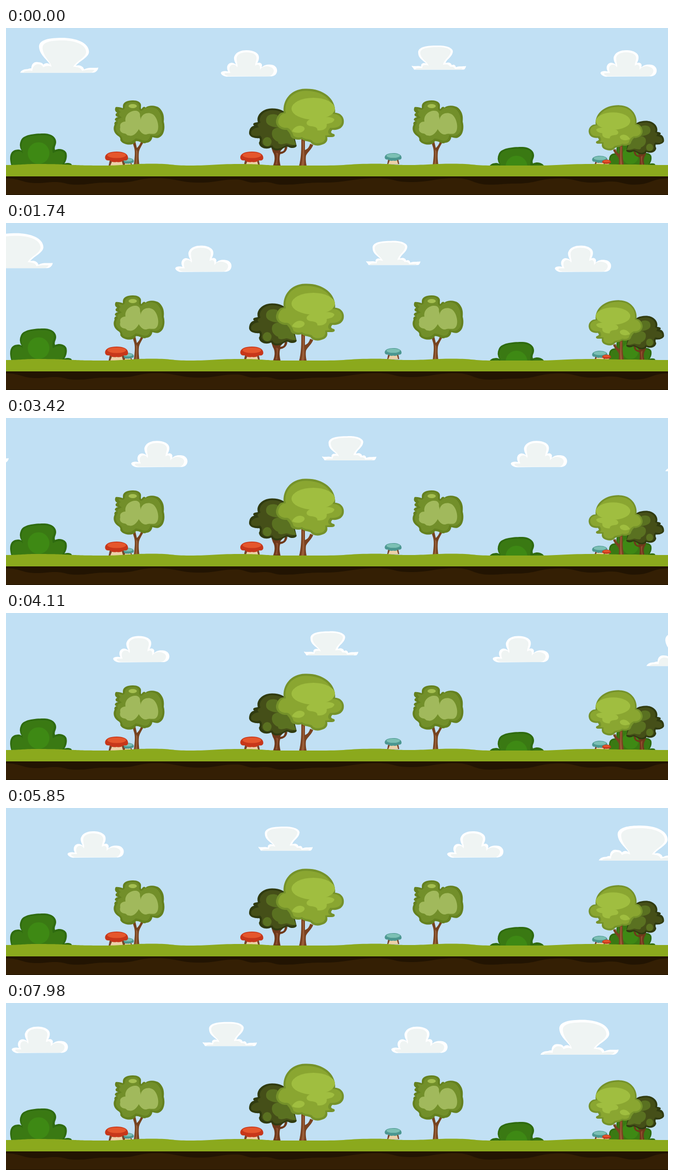
Write an HTML page that moves like this. It is 1280 by 323 pixels and loops after 8 s.

```html
<!DOCTYPE html>
<html lang="en">
<head>
<meta charset="utf-8">
<title>Meadow with drifting clouds</title>
<style>
  html, body { margin: 0; width: 100%; height: 100%; overflow: hidden; background: #c1e0f4; }
  svg { display: block; width: 1280px; height: 323px; }
  /* Lighter body inside a darker rim of the same outline */
  .inset { transform-box: fill-box; transform-origin: 50% 50%; transform: scale(.94); }
</style>
</head>
<body>
<svg viewBox="0 0 1280 323" xmlns="http://www.w3.org/2000/svg">
  <defs>
    <g id="wideCloud">
      <path fill="#fff" d="M27.5 86.5C29 82 35 79 42 79.5Q45 77.5 49 78C49 70 54 65 61 66C68 66 72 69 72 71C76 67 82 67 85 71C83 64 66 54 64 38C62 22 85 19 108 19C135 19 160 28 160.500 46C160 57 143 63 135 73C141 71 149 73 151 80C160 75 170 78 178.500 76.500C178 82 173 86.500 168 86.500Z"/>
      <path fill="#eff4f3" d="M33 86.500C36 82.500 42 82 51 83C51 76 55 70 62 70C68 70 71 73 72 76C76 73 83 72 88 75C88 67 74 58 71 42C68 27 85 24 108 24C132 24 155 31 155 47C154 58 137 63 130 75C138 75 146 77 147 83C156 80 163 81 171 81C169 84 166 86.500 162 86.500Z"/>
    </g>
    <g id="lobedCloud">
      <path fill="#fff" d="M429 94C422 95 415 90 415.500 86.500C418 82 426 83.500 429.500 84C424 74 431 66 438 67.500C441 68 443 69 445 71C441 64 440 58 441.500 55C445 46 455 43 465 43C480 43 490 49 489 58C489 62 487 65 486 68C491 65 495 69 495 72L494.500 76C499 71 506 70 513 71C521 72 525 78 524 84C523 91 517 94 510 93.500Z"/>
      <path fill="#eff4f3" d="M430 93C424 92 421 89 423 87.500C426 86.500 431 87 434 87C429 77 434 70 440 71C444 71 446 74 447 76C449 72 446 68 446 62C444 52 453 47 465 47C477 47 485 51 484.500 59C484 64 481 70 482 73C487 69 491 72 491 76V81C495 74 504 73 510 75C517 77 519 82 517 86C515 91 511 93.500 505 93.500Z"/>
    </g>
    <g id="smallCloud">
      <path fill="#fff" d="M789 80.500C788 77 784 75 784.500 73C788 75 797 72 803 74.500C801 69 808 66 813 69C806 63 797 58 797 48C796 36 815 34 833 34C852 33 865 39 864 46C863 56 851 61 850 68C856 65 861 68 862 72C865 70 869 71 870 76C876 73 882 75 889.500 73.500C889 77 887 80 885 80.500Z"/>
      <path fill="#eff4f3" d="M791 80.500C792 77 799 77 805 77.500C804 72 810 70 817 73C815 65 802 60 801 49C800 39 816 37 833 37C848 36 860 40 860 46C859 55 846 62 845 71C852 69 857 71 859 75C864 74 867 76 868 79L883 78L880 80.500Z"/>
    </g>

    <g id="oliveTree">
      <path fill="#76431f" d="M247 266C249 250 250 240 248 232L244 219H250L253 232C256 230 260 224 262 217L267 219C262 228 258 234 257 240C256 250 257 258 258 266Z"/>
      <path fill="#99603a" d="M250 264C252 252 252 243 251 235L254 238C255 247 253 256 254 264Z"/>
      <g id="oliveCrown">
        <path id="oliveOutline" fill="#64811f" d="M226 151C226 143 236 139.500 246 140C256 140 262 145 261 151Q260 155 262 157Q266 150 270 154C275 149 290 149 297 155C305 163 306 172 305 181C308 192 306 205 299 210C293 215 287 212 283 211C282 218 277 222 271 222C266 226 257 217 251 219C247 229 226 227 221 217Q222 212 217 209C209 204 206 195 210 187Q208 182 214 180C209 179 209 174 217 172C211 171 210 166 215 164C210 161 210 157 212 153C217 152 222 154 226 155Z"/>
        <use href="#oliveOutline" class="inset"/>
      </g>
      <path fill="#728f2a" d="M230 153C230 146 237 143 246 143C254 143 258 147 257 154C257 160 262 163 267 156C276 152 288 152 294 159C301 168 301 174 301 182C304 192 302 202 296 206C289 211 284 207 279 207C278 214 275 218 269 218C262 218 257 213 250 214C242 223 228 223 225 215C225 210 220 207 217 204C211 198 211 191 216 184C213 177 219 175 224 173C217 169 217 163 222 163C218 160 217 157 218 156C223 158 229 160 230 153Z"/>
      <path fill="#a1b95c" d="M221 192C219 184 226 181 231 181C229 168 240 160 250 160C257 160 260 165 259 170C262 180 261 190 256 197C252 204 245 210 238 208C233 208 233 204 229 204C222 203 219 198 221 192Z"/>
      <path fill="#a1b95c" d="M261 174C266 162 282 162 288 171C295 180 297 198 290 203C285 207 279 203 274 205C267 209 259 201 256 194Z"/>
      <ellipse cx="245" cy="151" rx="8" ry="4" fill="#a5bf50"/>
    </g>

    <g id="darkTree">
      <path fill="#6f391b" d="M516 267C521 255 520 246 516 240L513 231H519C521 237 526 237 531 231L536 232L530 239C535 240 539 237 539 230H544C543 241 535 243 530 244C528 252 529 258 531 267Z"/>
      <path fill="#915230" d="M521 264C524 254 524 247 522 241L526 242C527 250 524 257 525 264Z"/>
      <path id="darkOutline" fill="#303b10" d="M487 182C483 170 495 155 515 155.500C530 156 540 160 548 172L562 228C560 233 550 233 546 230C541 229 538 232 530 236C522 238 515 236 513 231C503 236 490 232 489 222Q492 217 490 213C484 214 471 212 470 204C470 195 474 190 480 189Q475 185 482 183Z"/>
      <path fill="#454f18" d="M492 183C487 172 498 159 515 159C530 160 537 163 544 174L558 226C553 229 548 227 543 226C538 228 533 232 527 233C520 234 517 231 515 227C505 231 494 228 494 220C496 215 495 211 491 208C484 210 474 209 474 203C474 197 480 193 489 192C484 188 487 185 492 183Z"/>
      <path fill="#5a7121" d="M503 180C502 169 512 164 524 168L538 188C531 197 503 191 503 180ZM515 199C520 190 533 193 547 190L561 226C553 227 548 224 542 223C535 225 526 227 526 220C517 217 512 208 515 199Z"/>
      <ellipse cx="505" cy="220" rx="8.500" ry="9" fill="#5a7121"/>
    </g>

    <g id="brightTree">
      <path fill="#7a4220" d="M566 269C571 252 571 235 571 213H578V236C583 234 586 231 588 224L594 226C591 235 583 240 580 247C579 255 580 262 582 269Z"/>
      <path fill="#9a5d38" d="M571 267C574 250 574 236 573 218L576 219C576 238 578 252 576 267Z"/>
      <path id="brightOutline" fill="#75922a" d="M537 163C534 141 550 118 578 117.500C610 116 638 134 636.500 164C648 164 655 174 653 184C651 194 642 198 631 197Q625 203 634 205C637 207 636 211 630 211L621 211C623 219 618 224 610 226C603 229 592 227 589 221C580 218 576 219 572 215C560 218 550 213 550 207Q547 201 543 197C528 198 519 186 523 176C526 166 532 163 537 163Z"/>
      <path fill="#8aa631" d="M541 165C537 143 552 122 579 121.500C609 121 635 137 632 166C645 167 651 174 649 183C647 191 638 194 627 193C621 199 622 205 628 207L617 208C619 215 615 221 608 222C602 224 594 222 591 217C582 214 577 215 572 211C562 214 554 209 555 205C551 198 549 195 544 193C531 194 524 186 527 177C530 168 535 165 541 165Z"/>
      <ellipse cx="594" cy="156" rx="42" ry="21" fill="#a0be40"/>
      <path fill="#a0be40" d="M582 181C588 173 600 176 608 174C620 171 632 172 635 177C633 184 625 184 620 186C622 195 612 199 602 198Q603 191 590 190C582 189 580 185 582 181Z"/>
      <path fill="#a0be40" d="M553 200C556 192 566 187 573 190C581 193 577 200 570 202C564 204 558 202 553 200Z"/>
    </g>

    <g id="bush">
      <path fill="#2f6b10" d="M11 268C5 250 8 237 20 235.500Q26 234 30 237Q24 228 29 217C34 205 60 204 75 204C92 205 100 215 96 226Q93 232 95 236C105 231 115 236 117 242C119 250 116 258 113 262C118 260 126 261 127 264V268Z"/>
      <path fill="#3a7913" d="M13 268C8 251 12 240 22 239C29 238 33 241 34 245C28 231 29 224 33 217C39 208 60 207 75 207.500C90 208 95 216 92 225C88 233 90 240 91 242C101 235 111 238 113 243C115 252 111 260 107 268Z"/>
      <circle cx="63" cy="242" r="21" fill="#3e8914"/>
    </g>

    <!-- Cap colour comes from the fill of each use, its light from color -->
    <g id="mushroom">
      <path fill="#77452a" d="M201 254H227L230 268H198Z"/>
      <path fill="#ecd0a8" d="M205 258H224L227 268H201Z"/>
      <path d="M191.500 251C191 243 201 239 214 239C227 239 236 243 236 251C236 256 232 257 227 256Q221 261 214 259Q206 261 201 256C195 257 192 255 191.500 251Z"/>
      <ellipse cx="214" cy="246" rx="18" ry="5.500" fill="currentColor"/>
    </g>
  </defs>

  <rect width="1280" height="323" fill="#c1e0f4"/>

  <g id="mainClouds">
    <use href="#wideCloud"/>
    <use href="#lobedCloud"/>
    <use href="#smallCloud"/>
    <use href="#lobedCloud" x="734"/>
  </g>
  <g id="lateCloud"><use href="#wideCloud"/></g>

  <use href="#bush"/>
  <use href="#bush" x="924" y="26"/>
  <use href="#bush" transform="translate(1160 66) scale(.75)"/>

  <g fill="#4c9790" color="#7cc0b4">
    <use href="#mushroom" transform="translate(122 121) scale(.53 .545)"/>
    <use href="#mushroom" transform="translate(592.500 67.500) scale(.73)"/>
  </g>

  <use href="#oliveTree"/>
  <use href="#oliveTree" x="578"/>
  <g id="grove">
    <use href="#darkTree"/>
    <use href="#brightTree"/>
  </g>
  <use href="#grove" transform="matrix(-.795 0 0 .795 1646 56)"/>

  <use href="#mushroom" transform="translate(1005 87) scale(.67)" fill="#4c9790" color="#7cc0b4"/>
  <g fill="#c7371a" color="#e5562c">
    <use href="#mushroom"/>
    <use href="#mushroom" x="261.500"/>
    <use href="#mushroom" transform="translate(1080 164) scale(.38)"/>
  </g>

  <path id="grass" fill="#8ba91d"/>
  <rect y="287" width="1280" height="36" fill="#221402"/>
  <path id="soil" fill="#341f04"/>
  <rect y="322" width="1280" height="1" fill="#221402"/>
</svg>

<script>
  const LOOP = 8000, STEP = 30;
  const el = id => document.getElementById(id);

  // Soft wave through x,y pairs, closed down to the given floor.
  function wave(points, floor) {
    let d = `M0 ${floor}V${points[0][1]}`;
    for (let i = 1; i < points.length; i++) {
      const [x0, y0] = points[i - 1], [x, y] = points[i], mid = (x0 + x) / 2;
      d += `C${mid} ${y0} ${mid} ${y} ${x} ${y}`;
    }
    return d + `V${floor}Z`;
  }

  el('grass').setAttribute('d', wave([
    [0, 265], [60, 263], [185, 266], [285, 262.5], [355, 266], [450, 263], [545, 266],
    [610, 266], [715, 262.5], [775, 265], [865, 262.5], [940, 266], [1020, 266],
    [1130, 263], [1200, 264], [1280, 265]
  ], 287));

  el('soil').setAttribute('d', wave([
    [0, 291], [60, 300], [95, 298], [135, 303], [195, 299], [215, 299], [290, 290.5],
    [375, 299], [445, 293], [480, 299], [500, 298], [535, 303], [610, 299], [720, 290.5],
    [780, 298], [870, 290.5], [935, 303], [985, 301], [1070, 291], [1135, 299],
    [1170, 297], [1215, 303], [1280, 291]
  ], 322));

  const place = (id, x, y) => el(id).setAttribute('transform', `translate(${x} ${y})`);

  const start = performance.now();
  function draw(now) {
    const t = Math.floor(Math.max(0, now - start) % LOOP / STEP) * STEP;
    place('mainClouds', -.05067 * t, .00036 * t);
    place('lateCloud', 1428.6 - .05296 * t, 18.8 - .00066 * t);
    requestAnimationFrame(draw);
  }
  draw(start);
</script>
</body>
</html>
```
